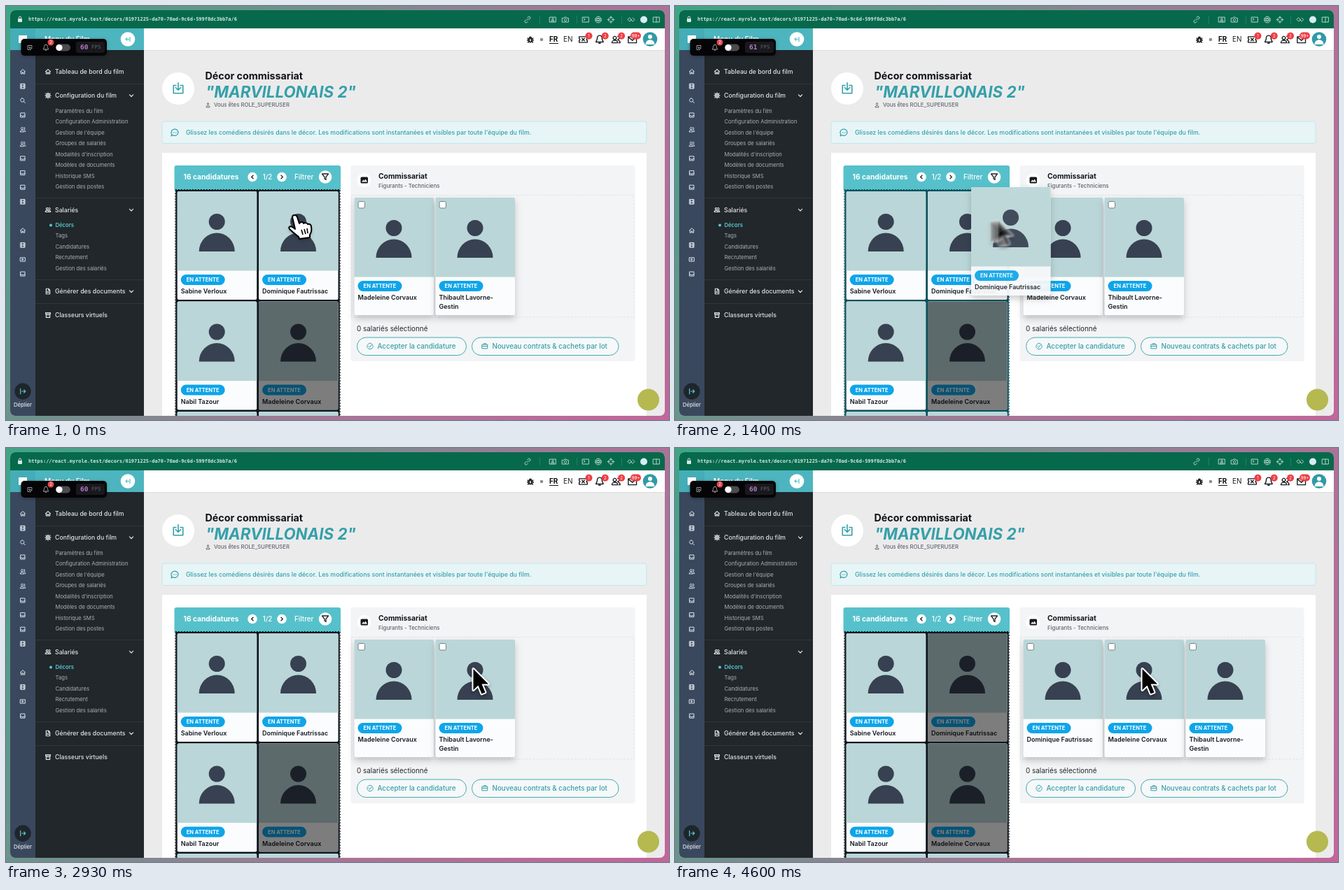
Write an HTML page with a canvas that moves like this. It is 947 px wide and 592 px high and loops after 4.99 s.

```html
<!DOCTYPE html>
<html lang="fr">
<head>
<meta charset="utf-8">
<title>Décor</title>
<style>
html, body { margin: 0; width: 100%; height: 100%; overflow: hidden; }
canvas { display: block; width: 947px; height: 592px; }
</style>
</head>
<body>
<canvas id="stage" width="947" height="592"></canvas>
<script>
const ctx = document.getElementById('stage').getContext('2d');
const LOOP = 4990, STEP = 200 / 3, LAST_STEP = 69;
const TEAL = '#35a0a9', LIGHT_TEAL = '#56c1cb', SLATE = '#374151';
const people = {
  marion: ['Sabine Verloux'],
  chris: ['Dominique Fautrissac'],
  karim: ['Nabil Tazour'],
  alex: ['Madeleine Corvaux'],
  gauthier: ['Thibault Lavorne-', 'Gestin']
};
const GRAB = 1060, DROP = 2500, REFRESH = 4060;
// time, x and y offset of the dragged card
const dragPath = [
  [1070, 0, 0], [1133, 5, 0], [1400, 62, -6], [1667, 175, -11], [1867, 240, -3], [2067, 262, 4]
];

// icon outlines on a 24 unit grid
const icons = {
  home: 'M3 11l9-8 9 8M5 10v10h5v-6h4v6h5V10',
  film: 'M4 3h16v18H4zM8 3v18M16 3v18M4 9h4M4 15h4M16 9h4M16 15h4M8 12h8',
  search: 'M10 3a7 7 0 1 0 .01 0M15 15l6 6',
  inbox: 'M4 4h16v16H4zM4 14h5l1 2h4l1-2h5',
  user: 'M12 3a4 4 0 1 0 .01 0M4 21c0-9 16-9 16 0z',
  users: 'M9 4a4 4 0 1 0 .01 0M2 20c0-8 14-8 14 0zM16 4a4 4 0 0 1 0 8M18 14c3 1 4 3 4 6h-3',
  video: 'M3 5h18v14H3zM10 9l5 3-5 3z',
  down: 'M5 9l7 7 7-7', left: 'M15 5l-7 7 7 7', right: 'M9 5l7 7-7 7',
  gear: 'M12 5a7 7 0 1 0 .01 0M12 9a3 3 0 1 0 .01 0M12 1v4M12 19v4M1 12h4M19 12h4M4 4l3 3M17 17l3 3M4 20l3-3M17 7l3-3',
  doc: 'M5 2h9l5 5v15H5zM14 2v5h5M9 12h6M9 16h6',
  archive: 'M3 3h18v5H3zM5 8v13h14V8M9 12h6',
  bell: 'M12 2c-5 0-6 4-6 8 0 4-3 6-3 8h18c0-2-3-4-3-8 0-4-1-8-6-8M10 21h4',
  ticket: 'M2 5h20v5a2 2 0 0 0 0 4v5H2v-5a2 2 0 0 0 0-4zM9 9l6 6M15 9l-6 6',
  mail: 'M2 5h20v15H2zM2 6l10 8 10-8',
  bug: 'M8 8h8v8c0 6-8 6-8 0zM9 7c0-5 6-5 6 0M8 11L3 8M16 11l5-3M8 14H2M16 14h6M8 18l-4 3M16 18l4 3',
  download: 'M8 6H3v15h18V6h-5M12 1v13M7 10l5 5 5-5',
  chat: 'M12 3a9 8.5 0 1 1-5 15.5L3 21l1-5A9 8.5 0 0 1 12 3M8 12h.5M12 12h.5M16 12h.5',
  filter: 'M3 3h18l-7 9v8l-4-3v-5z',
  check: 'M12 2a10 10 0 1 0 .01 0M7 12l4 4 6-8',
  wallet: 'M3 6h18v14H3zM3 12h18M8 6V3h8v3',
  link: 'M10 14l6-6M11 6l3-3a4 4 0 0 1 6 6l-3 3M13 18l-3 3a4 4 0 0 1-6-6l3-3',
  camera: 'M2 7h5l2-3h6l2 3h5v13H2zM12 9a4 4 0 1 0 .01 0',
  badge: 'M2 4h20v16H2zM12 7a3 3 0 1 0 .01 0M7 17c0-5 10-5 10 0z',
  panel: 'M2 4h20v16H2zM12 4v16',
  terminal: 'M2 4h20v16H2zM6 8l4 3-4 3',
  target: 'M12 4a8 8 0 1 0 .01 0M12 1v7M12 16v7M1 12h7M16 12h7',
  ring: 'M12 2a10 10 0 1 0 .01 0M12 7a5 5 0 1 0 .01 0M3 9h18M3 15h18',
  diamonds: 'M7 6l6 6-6 6-6-6zM17 6l6 6-6 6-6-6',
  select: 'M20 9V4H4v16h5M10 10l11 4-5 2-2 5z',
  exit: 'M4 3v18M9 12h12M16 7l5 5-5 5',
  collapse: 'M20 4v16M16 12H4M9 7l-5 5 5 5'
};
for (const key in icons) icons[key] = new Path2D(icons[key]);

function icon(name, x, y, size, color, weight = 1) {
  ctx.save();
  ctx.translate(x - size / 2, y - size / 2);
  ctx.scale(size / 24, size / 24);
  ctx.strokeStyle = color;
  ctx.lineWidth = weight * 24 / size;
  ctx.lineJoin = ctx.lineCap = 'round';
  ctx.stroke(icons[name]);
  ctx.restore();
}

function rect(x, y, w, h, fill) {
  ctx.fillStyle = fill;
  ctx.fillRect(x, y, w, h);
}

function box(x, y, w, h, r, fill, stroke, line = 1) {
  ctx.beginPath();
  ctx.roundRect(x, y, w, h, r);
  if (fill) { ctx.fillStyle = fill; ctx.fill(); }
  if (stroke) { ctx.strokeStyle = stroke; ctx.lineWidth = line; ctx.stroke(); }
}

function disc(x, y, r, fill) {
  ctx.beginPath();
  ctx.arc(x, y, r, 0, 7);
  ctx.fillStyle = fill;
  ctx.fill();
}

function text(s, x, y, size, color, weight = 400, align = 'left', family = 'Inter, sans-serif') {
  ctx.font = `${weight} ${size}px ${family}`;
  ctx.textAlign = align;
  ctx.textBaseline = 'middle';
  ctx.fillStyle = color;
  ctx.fillText(s, x, y);
}

function shadow(color, blur, dy, draw) {
  ctx.save();
  ctx.shadowColor = color;
  ctx.shadowBlur = blur;
  ctx.shadowOffsetY = dy;
  draw();
  ctx.restore();
}

function silhouette(x, y, color) {
  disc(x, y, 11.5, color);
  ctx.beginPath();
  ctx.ellipse(x, y + 42.5, 25.5, 26.5, 0, Math.PI, 0);
  ctx.fill();
}

function card(x, y, h, name, { dark, lift, checkbox } = {}) {
  const image = 113.5, label = y + image + 13;
  const base = () => box(x, y, 113.5, h, 2, '#fbfcfd');
  if (lift) shadow('rgba(0,0,0,.2)', 10, 5, base); else base();
  box(x, y, 113.5, image, [2, 2, 0, 0], '#bad6d8');
  silhouette(x + 56.5, y + 43.5, SLATE);
  box(x + 5, label - 7.5, 63, 15, 7.5, '#0ea5e9');
  text('EN ATTENTE', x + 36.5, label + .3, 7.5, '#fff', 700, 'center');
  name.forEach((part, i) => text(part, x + 5, label + 17 + i * 13, 9, '#151a22', 600));
  if (checkbox) box(x + 5.5, y + 5.5, 9.5, 9.5, 2, '#fff', '#777f88');
  if (dark) box(x, y, 113.5, h, 2, 'rgba(0,0,0,.5)');
}

function browser() {
  const g = ctx.createLinearGradient(0, 0, 947, 592);
  g.addColorStop(0, '#3fa585');
  g.addColorStop(.3, '#6d938b');
  g.addColorStop(.65, '#a87597');
  g.addColorStop(1, '#c2659b');
  rect(0, 0, 947, 592, g);
  box(6, 6, 935, 580, 7, '#ebebec');
  box(6, 6, 935, 26, [7, 7, 0, 0], '#07694c');
  box(17, 18, 6, 5, 1, '#d6e9e0');
  box(18.3, 15, 3.4, 5, 1.7, null, '#d6e9e0');
  text('https://react.myrole.test/decors/01971225-da70-70ad-9c6d-599f8dc3bb7a/6',
    32, 19.5, 6.97, '#d6e9e0', 700, 'left', '"DejaVu Sans Mono", monospace');
  const tools = { link: 745, badge: 781, camera: 799, terminal: 828, ring: 846, target: 864, diamonds: 893, panel: 929 };
  for (const name in tools) icon(name, tools[name], 19.5, 10.5, '#c3dfd3', .9);
  disc(911, 19.5, 5, '#d9ecf5');
  for (const x of [762, 815, 879]) rect(x, 14, 1, 11, 'rgba(255,255,255,.13)');
}

function topBar() {
  rect(197, 32, 744, 31.5, '#fff');
  rect(197, 63, 744, 1, '#dcdcde');
  icon('bug', 749, 48, 10, '#222', 1.8);
  disc(765, 48, 2.3, '#8b8f94');
  text('FR', 776, 48, 10, '#111', 700);
  rect(776, 53, 13, 1, '#111');
  text('EN', 796, 48, 10, '#222');
  ['ticket', 'bell', 'users', 'mail'].forEach((name, i) => {
    icon(name, 824.5 + i * 23.4, 48, 14, '#181b20', 1.4);
    if (i < 3) {
      disc(832.5 + i * 23.3, 42.7, 5, '#ef3e43');
      text(i ? '2' : '1', 832.5 + i * 23.3, 43, 6, '#fff', 400, 'center');
    }
  });
  box(892, 37.5, 15, 10, 5, '#ef3e43');
  text('99+', 899.5, 43, 6, '#fff', 500, 'center');
  disc(920, 47.5, 10.3, '#309aa7');
  ctx.save();
  ctx.translate(920, 44);
  ctx.scale(.26, .26);
  silhouette(0, 0, '#fff');
  ctx.restore();
}

function sidebar() {
  box(6, 32, 36, 554, [0, 0, 0, 7], '#3a485e');
  rect(42, 32, 155, 554, '#21272b');
  rect(6, 32, 36, 31, '#45adb8');
  rect(42, 32, 155, 31, '#4db5bf');
  rect(18, 42, 12, 11, '#fff');
  text('Menu du Film', 55, 47.5, 10, '#fff', 600);
  disc(174, 47.5, 10.3, '#fff');
  icon('collapse', 174, 47.5, 9, LIGHT_TEAL, 1.2);

  const rail = ['home', 'film', 'search', 'inbox', 'users', 'users', 'inbox', 'inbox', 'inbox', 'film',
    null, 'home', 'film', 'video', 'inbox'];
  rail.forEach((name, i) => name && icon(name, 24, 94 + i * 20.65, 9, '#dce2e9', 1));
  disc(24, 551, 11.7, '#1e262c');
  icon('exit', 24, 551, 10, '#63c6cf', 1.2);
  text('Déplier', 24, 570.5, 7.7, '#e1e5e9', 500, 'center');

  const entry = (name, label, y, open) => {
    icon(name, 60, y, 9, '#e2e5e7', 1.2);
    text(label, 70, y + .5, 8.75, '#e2e5e7', 500);
    if (open) icon('down', 179, y, 9, '#e2e5e7', 1.2);
  };
  entry('home', 'Tableau de bord du film', 94);
  entry('gear', 'Configuration du film', 128, true);
  entry('users', 'Salariés', 291.5, true);
  entry('doc', 'Générer des documents', 408, true);
  entry('archive', 'Classeurs virtuels', 442);
  for (const y of [111, 274, 391, 425]) rect(42, y, 155, 1, '#30373c');

  const list = (labels, y) => labels.forEach((label, i) =>
    text(label, 70.5, y + i * 15.5, 7.7, label === 'Décors' ? '#59c8d1' : '#a9afb3', label === 'Décors' ? 600 : 400));
  list(['Paramètres du film', 'Configuration Administration', "Gestion de l'équipe", 'Groupes de salariés',
    "Modalités d'inscription", 'Modèles de documents', 'Historique SMS', 'Gestion des postes'], 150.5);
  list(['Décors', 'Tags', 'Candidatures', 'Recrutement', 'Gestion des salariés'], 313.5);
  disc(64, 313.5, 2, '#59c8d1');
}

function fpsWidget(fps) {
  shadow('rgba(0,0,0,.3)', 5, 1, () => box(21.5, 47, 122.5, 24, 5, '#050507'));
  icon('select', 34, 59.5, 9, '#99999f', 1);
  icon('bell', 57, 59.5, 10, '#a9a9af', 1);
  disc(64, 52, 4.5, '#e5484d');
  text('2', 64, 52.3, 6, '#fff', 400, 'center');
  box(71, 54.5, 21, 10, 5, '#4b4b50');
  disc(76, 59.5, 4.6, '#fff');
  box(100, 51, 41, 16, 3, '#18181d');
  const mono = '"DejaVu Sans Mono", monospace';
  text(fps, 106, 59.5, 9.5, '#b67dc4', 700, 'left', mono);
  text('FPS', 122, 59.5, 7.5, '#4d4d55', 700, 'left', mono);
}

function heading() {
  disc(246, 118, 23, '#fff');
  icon('download', 246, 118, 18, TEAL, 1.6);
  text('Décor commissariat', 284.5, 100.5, 14.25, '#111418', 700);
  text('"MARVILLONAIS 2"', 285, 124, 22.3, TEAL, 'italic 700');
  icon('user', 288.5, 141.5, 7.5, '#555', .9);
  text('Vous êtes ROLE_SUPERUSER', 297, 141.5, 7.8, '#4b5158');
  box(223, 165, 692, 31.5, 3, '#e7f5f7', '#c4e6ea');
  icon('chat', 241, 181, 13, TEAL, 1.2);
  text("Glissez les comédiens désirés dans le décor. Les modifications sont instantanées et visibles par toute l'équipe du film.",
    257, 181, 8.75, TEAL, 500);
  rect(223, 210, 692, 376, '#fff');
}

function candidates(over, refreshed) {
  box(240.5, 228, 237.5, 35, [3, 3, 0, 0], LIGHT_TEAL);
  text('16 candidatures', 253.5, 244.8, 10.2, '#fff', 700);
  disc(352, 244.5, 6.8, '#fff');
  icon('left', 352, 244.5, 8, '#20262c', 1.4);
  text('1/2', 373.5, 244.8, 9.7, '#fff', 500, 'center');
  disc(394, 244.5, 6.8, '#fff');
  icon('right', 394, 244.5, 8, '#20262c', 1.4);
  text('Filtrer', 412, 244.8, 9.8, '#fff', 500);
  disc(456, 244.5, 9.3, '#fff');
  icon('filter', 456, 244.5, 12, '#20262c', 1.3);

  ctx.save();
  ctx.beginPath();
  ctx.rect(240, 261, 239, 325);
  ctx.clip();
  const frame = over ? '#0d505a' : '#0c151c';
  rect(242.3, 263, 234.4, 330, frame);
  ctx.setLineDash([2, 2]);
  ctx.strokeStyle = frame;
  ctx.lineWidth = 1;
  ctx.strokeRect(241.8, 262.5, 235.4, 340);
  ctx.setLineDash([]);
  card(244.7, 265, 155, people.marion);
  card(361, 265, 155, people.chris, { dark: refreshed });
  card(244.7, 422.5, 155, people.karim);
  card(361, 422.5, 155, people.alex, { dark: true });
  card(244.7, 580, 155, people.karim);
  card(361, 580, 155, people.marion);
  ctx.restore();
}

function pill(x, w, name, label) {
  box(x, 474, w, 25.5, 12.75, '#f6f8f9', '#43aab3');
  icon(name, x + 18.5, 486.5, 10, TEAL, 1);
  text(label, x + 29, 487, 9.8, TEAL, 500);
}

function decor(over, refreshed) {
  box(492.5, 228, 406, 280, 3, '#f3f4f5');
  disc(511.5, 249, 10, '#fff');
  box(506.5, 244.5, 10.5, 9, 1.5, '#15191e');
  ctx.fillStyle = '#fff';
  ctx.fill(new Path2D('M508 251.5L510.5 248.5 512 250 513.5 247.5 516 251.5Z'));
  text('Commissariat', 532, 243.8, 10.3, '#12161b', 700);
  text('Figurants - Techniciens', 532, 257.8, 7.8, '#5b636c', 500);

  ctx.save();
  if (over) rect(493.5, 270.5, 403.5, 174.5, '#dbeef0');
  ctx.setLineDash([3, 2]);
  ctx.strokeStyle = over ? '#42b4bf' : '#e1e4e7';
  ctx.lineWidth = 1;
  ctx.strokeRect(493.5, 270.5, 403.5, 174.5);
  ctx.restore();
  const cast = [people.alex, people.gauthier];
  if (refreshed) cast.unshift(people.chris);
  cast.forEach((name, i) => card(497.5 + i * 116, 274, 168, name, { lift: true, checkbox: true }));

  text('0 salariés sélectionné', 501, 461.8, 9.9, '#22272d');
  pill(501.5, 156, 'check', 'Accepter la candidature');
  pill(665.5, 209.5, 'wallet', 'Nouveau contrats & cachets par lot');
}

const arrowShape = new Path2D('M0 0V30L7 23.5 12 35.5 17 33.500 12 21.500H21.500Z');
const handShape = new Path2D('M6 5C6 1 12 1 13 5L16 14C18 11 22 12 22 14C24 12 27 13 28 15C31 14 33 16 33 19' +
  'C34 24 33 27 31 30V34L16 36 15 33C11 30 6 26 2 22C0 19 3 17 6 19L10 22Z');
const handLines = new Path2D('M19 23l2 7M23 22l2 7M27 21l1 7');

function arrow(x, y) {
  ctx.save();
  ctx.translate(x, y);
  ctx.lineJoin = 'round';
  shadow('rgba(0,0,0,.35)', 4, 2, () => {
    ctx.strokeStyle = '#fff';
    ctx.lineWidth = 4;
    ctx.stroke(arrowShape);
  });
  ctx.fillStyle = '#000';
  ctx.fill(arrowShape);
  ctx.restore();
}

function hand(x, y) {
  ctx.save();
  ctx.translate(x, y);
  ctx.fillStyle = '#fff';
  shadow('rgba(0,0,0,.35)', 4, 2, () => ctx.fill(handShape));
  ctx.strokeStyle = '#000';
  ctx.lineWidth = 2;
  ctx.lineJoin = 'round';
  ctx.stroke(handShape);
  ctx.lineWidth = 1.6;
  ctx.stroke(handLines);
  ctx.restore();
}

function offsetAt(t) {
  const next = dragPath.findIndex(p => p[0] > t);
  if (next === 0) return [0, 0];
  if (next < 0) return dragPath[dragPath.length - 1].slice(1);
  const [a, b] = [dragPath[next - 1], dragPath[next]];
  const k = (t - a[0]) / (b[0] - a[0]);
  return [a[1] + (b[1] - a[1]) * k, a[2] + (b[2] - a[2]) * k];
}

function pointer(t) {
  if (t < GRAB) return hand(403, 297);
  const place = lag => {
    const [x, y] = offsetAt(t - lag);
    arrow(405.5 + x, 312 + y);
  };
  if (offsetAt(t)[0] - offsetAt(t - 60)[0] < 8) return place(0);
  ctx.save();
  ctx.globalAlpha = .38;
  ctx.filter = 'blur(1px)';
  [75, 60, 45, 30].forEach(place);
  ctx.restore();
}

function toast(t) {
  if (t < 3390 || t > 4400) return;
  const rise = Math.min(1, (t - 3390) / 220), fall = Math.max(0, (t - 4250) / 150);
  const top = 588 - 46 * (1 - (1 - rise) ** 2) * (1 - fall) + 7 * (1 - rise);
  ctx.save();
  ctx.beginPath();
  ctx.rect(197, 64, 744, 522);
  ctx.clip();
  shadow('rgba(0,0,0,.15)', 8, 2, () => box(371, top, 208, 40, 4, '#fff'));
  ctx.beginPath();
  ctx.arc(386, top + 20, 5, t / 120, t / 120 + 4.7);
  ctx.strokeStyle = '#d8bcc4';
  ctx.lineWidth = 1.3;
  ctx.stroke();
  text('Chargement en cours', 401, top + 20, 9, '#3f454c', 500);
  ctx.restore();
}

function draw(t) {
  const dragging = t >= GRAB && t < DROP, refreshed = t >= REFRESH;
  const [dx, dy] = offsetAt(t);
  const overDecor = dragging && dx > 89;
  browser();
  topBar();
  sidebar();
  fpsWidget(t > 1060 && t < 2060 ? '61' : '60');
  heading();
  candidates(dragging && !overDecor, refreshed);
  decor(overDecor, refreshed);
  disc(917.5, 563, 15.5, '#b5b950');
  if (dragging) {
    ctx.save();
    ctx.globalAlpha = .92;
    card(361 + dx, 265 + dy, 155, people.chris, { lift: true });
    ctx.restore();
  }
  toast(t);
  pointer(t);
}

const start = performance.now();
function tick() {
  const t = (performance.now() - start) % LOOP;
  draw(Math.min(LAST_STEP, Math.floor((t + 4) / STEP)) * STEP);
  requestAnimationFrame(tick);
}
tick();
</script>
</body>
</html>
```
